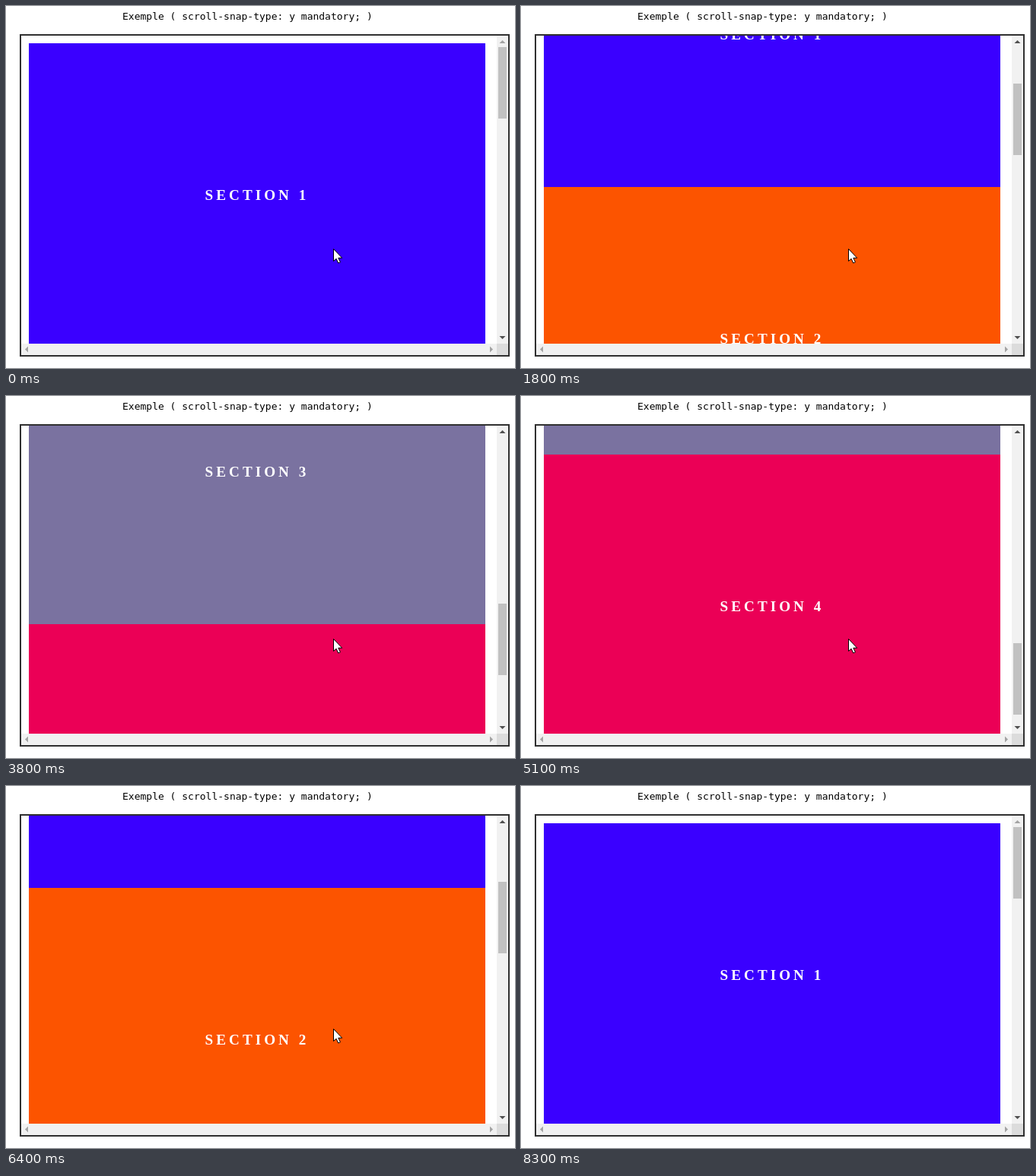
Write an HTML page that moves like this. It is 669x476 px and loops after 8700 ms.

```html
<!DOCTYPE html>
<html lang="fr">
<head>
<meta charset="utf-8">
<title>Scroll snap</title>
<style>
  html, body { margin: 0; width: 100%; height: 100%; overflow: hidden; background: #fff; }
  svg { display: block; }
  .caption { font: 13px "DejaVu Sans Mono", monospace; white-space: pre; }
  .label { font: bold 19.2px "Liberation Serif", serif; letter-spacing: 4px; fill: #fff; }
</style>
</head>
<body>
<svg width="669" height="476" viewBox="0 0 669 476">
  <defs><clipPath id="view"><rect x="20" y="39" width="625" height="405"/></clipPath></defs>
  <text class="caption" x="153" y="18">Exemple ( scroll-snap-type: y mandatory; )</text>
  <g clip-path="url(#view)"><g id="content"></g></g>
  <g shape-rendering="crispEdges">
    <path d="M645 39h15v405h-15zM20 444h625v15h-625z" fill="#f1f1f1"/>
    <rect x="645" y="444" width="15" height="15" fill="#dcdcdc"/>
    <rect id="thumb" x="647" y="54" width="11" height="94" fill="#c1c1c1"/>
    <rect x="19" y="38" width="642" height="422" fill="none" stroke="#303030" stroke-width="2"/>
  </g>
  <path id="up" d="M648.5 49h8l-4-4z"/>
  <path id="down" d="M648.5 434h8l-4 4z"/>
  <path d="M29 447.5v8l-4-4zM636 447.5v8l4-4z" fill="#a3a3a3"/>
  <path id="cursor" d="M.5 .5v16l3.6-3.2 2.6 5.7 2.7-1.2-2.6-5.5h4.9z" fill="#fff" stroke="#000"/>
</svg>
<script>
const LOOP = 8700, STEP = 100, MAX_SCROLL = 1215;
const COLORS = ['#3a00ff', '#fc5400', '#7a72a0', '#eb0056'];
const $ = id => document.getElementById(id);

// [time, scroll offset]
const scrollKeys = [
  [0, 0], [1000, 0], [1800, 211], [1900, 211], [2400, 424], [2700, 424],
  [3500, 901], [3700, 901], [3800, 949], [4000, 1050], [4300, MAX_SCROLL],
  [5000, MAX_SCROLL], [5100, 1172], [5300, 898], [5400, 898], [5800, 580],
  [6000, 580], [6400, 315], [6500, 315], [6600, 280], [6700, 165], [6800, 80],
  [6900, 49], [7100, 49], [7200, 47], [7500, 0]
];
// [time, x, y]
const cursorKeys = [[0, 430, 319], [7500, 430, 319], [8000, 161, 44], [8100, 125, 17]];

$('content').innerHTML = COLORS.map((color, i) => `
  <rect x="30" y="${49 + 400 * i}" width="600" height="400" fill="${color}"/>
  <text class="label" x="261.6" y="${255 + 400 * i}">SECTION ${i + 1}</text>`).join('');

const smooth = p => p * p * (3 - 2 * p);

function valueAt(keys, time, column = 1) {
  const next = keys.findIndex(key => key[0] > time);
  if (next < 0) return keys[keys.length - 1][column];
  const a = keys[next - 1], b = keys[next];
  const p = smooth((time - a[0]) / (b[0] - a[0]));
  return a[column] + (b[column] - a[column]) * p;
}

function setArrow(id, enabled) {
  $(id).setAttribute('fill', enabled ? '#505050' : '#a3a3a3');
}

function render(now) {
  const time = Math.floor((now % LOOP) / STEP) * STEP;
  const scroll = Math.round(valueAt(scrollKeys, time));
  $('content').setAttribute('transform', `translate(0 ${-scroll})`);
  $('thumb').setAttribute('y', 54 + Math.floor(scroll * 375 / 1620));
  setArrow('up', scroll > 0);
  setArrow('down', scroll < MAX_SCROLL);
  const x = Math.round(valueAt(cursorKeys, time, 1));
  const y = Math.round(valueAt(cursorKeys, time, 2));
  $('cursor').setAttribute('transform', `translate(${x} ${y})`);
  $('cursor').setAttribute('visibility', time < 8300 ? 'visible' : 'hidden');
}

const start = performance.now();
function tick() {
  render(performance.now() - start);
  requestAnimationFrame(tick);
}
tick();
</script>
</body>
</html>
```
